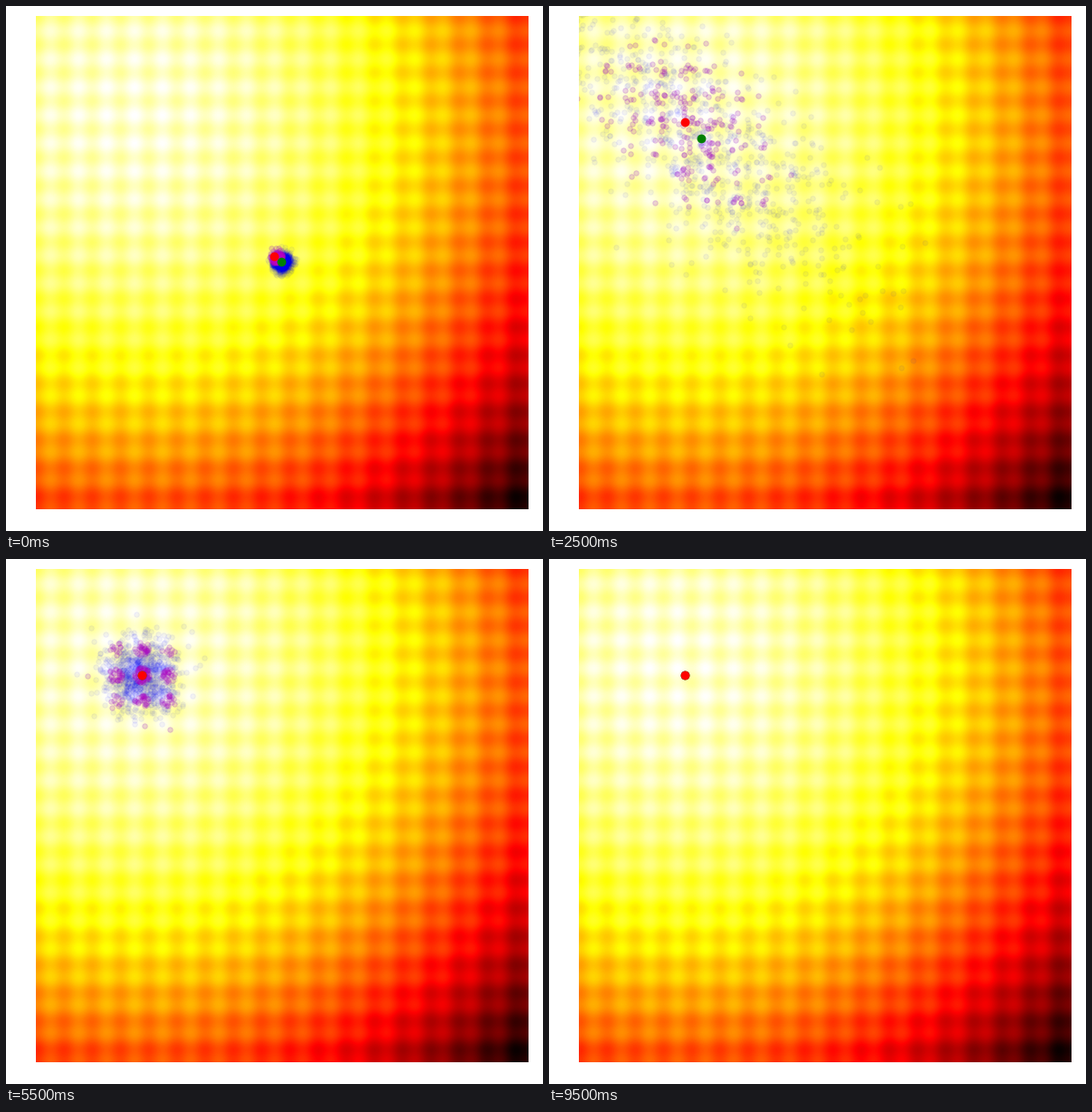
Animation of 593 by 579 pixels, one loop 10000 ms. Source, as a matplotlib script:

```python
import numpy as np
import matplotlib.pyplot as plt
from matplotlib.animation import FuncAnimation

WIDTH, HEIGHT, DPI = 593, 579, 64
LEFT, TOP, SIDE = 33, 11, 544
PT = 72 / DPI  # points per pixel
GENERATIONS, POPULATION, ELITE = 20, 1000, 250
START = np.array([305.0, 283.0])
OPTIMUM = np.array([150.0, 128.0])


def rastrigin(x, y, center, period):
    u, v = (x - center[0]) / period, (y - center[1]) / period
    return 20 + u**2 + v**2 - 10 * (np.cos(2 * np.pi * u) + np.cos(2 * np.pi * v))


def mean_at(generation):
    """Slide from start to optimum along a logistic curve."""
    rest = 1 / (1 + np.exp(1.48 * (generation - 3.61)))
    return OPTIMUM + (START - OPTIMUM) * rest


def best_at(generation):
    """The best solution runs ahead of the mean and settles on the optimum."""
    keys = [0, 2, 4, 5]
    return (np.interp(generation, keys, [296, 240, 149, 150]),
            np.interp(generation, keys, [275.5, 213, 99, 128]))


def spread_at(generation):
    """Spread along and across the diagonal: grows, turns round, then shrinks."""
    keys = [0, 4, 7, 15, 19]
    along = np.log([5, 170, 36, 11.5, 0.5])
    across = np.log([5, 46, 36, 11.5, 0.5])
    return (np.exp(np.interp(generation, keys, along)),
            np.exp(np.interp(generation, keys, across)))


def sample(generation):
    rng = np.random.default_rng(40 + generation)
    along, across = spread_at(generation)
    a, b = rng.standard_normal((2, POPULATION))
    a, b = a * along, b * across
    cloud = mean_at(generation) + np.column_stack([a + b, a - b]) / np.sqrt(2)
    order = np.argsort(rastrigin(cloud[:, 0], cloud[:, 1], OPTIMUM, 29.5))
    return cloud, cloud[order[:ELITE]]


fig = plt.figure(figsize=(WIDTH / DPI, HEIGHT / DPI), dpi=DPI, facecolor="white")
ax = fig.add_axes([LEFT / WIDTH, 1 - (TOP + SIDE) / HEIGHT, SIDE / WIDTH, SIDE / HEIGHT])
ax.axis("off")

grid = np.arange(SIDE) + 0.5
gx, gy = np.meshgrid(LEFT + grid, TOP + grid)
ax.imshow(-rastrigin(gx, gy, (142, 120.5), 31.05), cmap="hot", interpolation="nearest",
          extent=(LEFT, LEFT + SIDE, TOP + SIDE, TOP), aspect="auto")
ax.set_xlim(LEFT, LEFT + SIDE)
ax.set_ylim(TOP + SIDE, TOP)


def cloud_artist(color, alpha):
    return ax.scatter([], [], s=(5.5 * PT) ** 2, c=color, alpha=alpha,
                      edgecolors=color, linewidths=PT)


def dot_artist(color):
    return ax.plot([], [], "o", color=color, ms=9.8 * PT, mew=0)[0]


everyone = cloud_artist("b", 0.05)
elite = cloud_artist("m", 0.13)
mean_dot = dot_artist("g")
best_dot = dot_artist("r")


def update(generation):
    cloud, chosen = sample(generation)
    everyone.set_offsets(cloud)
    elite.set_offsets(chosen)
    for dot, (x, y) in ((mean_dot, mean_at(generation)), (best_dot, best_at(generation))):
        dot.set_data([x], [y])
    return everyone, elite, mean_dot, best_dot


anim = FuncAnimation(fig, update, frames=GENERATIONS, interval=500,
                     repeat=True, repeat_delay=0)
plt.show()
```
